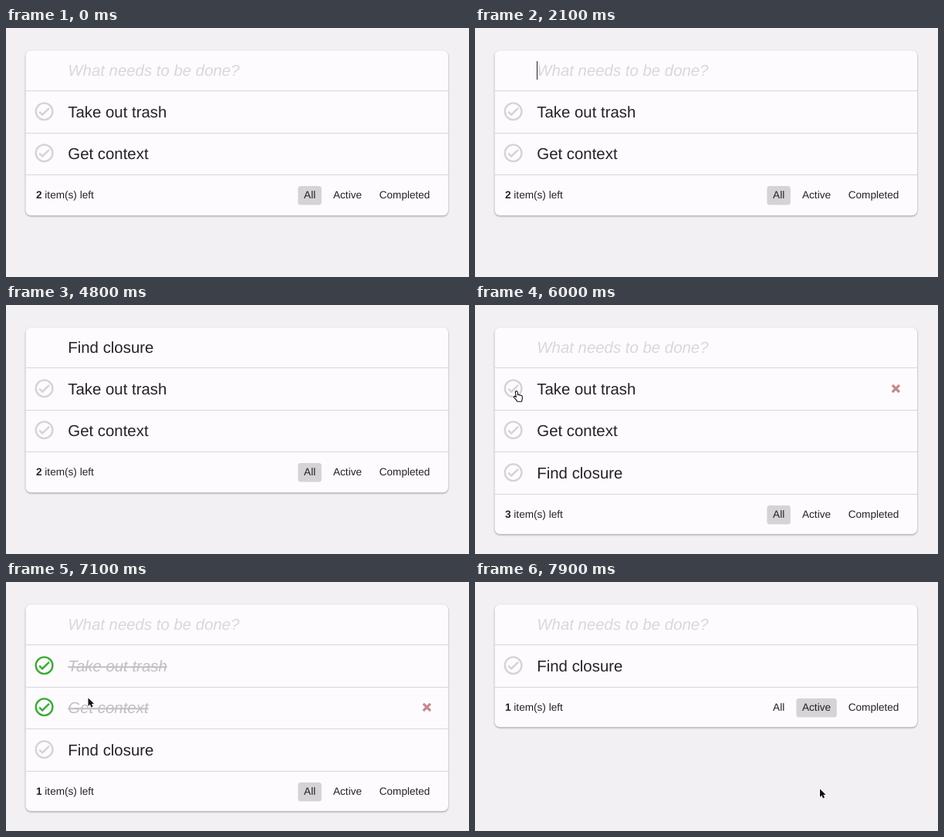
Animation, 600 px wide and 323 px high, one loop 8 s. Source, as an HTML page:

```html
<!DOCTYPE html>
<html lang="en">
<head>
<meta charset="utf-8">
<title>Todo list</title>
<style>
  html, body { margin: 0; width: 100%; height: 100%; overflow: hidden; background: #f2f0f3; }
  svg { display: block; }
  text { font: 20.4px "Liberation Sans", Arial, sans-serif; fill: #242226; white-space: pre; text-rendering: geometricPrecision; }
  .card { fill: #fdfbfe; filter: drop-shadow(0 1px 1px rgba(0, 0, 0, .38)); }
  .line { fill: #d8d6d9; }
  .hint { font-style: italic; fill: #d9d7da; }
  .done { font-style: italic; text-decoration: line-through; text-decoration-thickness: 1.4px; }
  .cross { stroke: #c48a8e; stroke-width: 3.2; }
  .pill { fill: #d5d3d6; }
  .foot text { font-size: 13.6px; }
  .foot tspan { font-weight: bold; }
  .arrow { fill: #111; stroke: #fff; stroke-width: 1.2; paint-order: stroke; }
  .hand { fill: #fff; stroke: #111; stroke-width: 1.1; stroke-linejoin: round; }
  .beam { fill: none; stroke: #333; stroke-width: 1.1; }
</style>
</head>
<body>
<svg width="600" height="323" viewBox="0 0 600 323">
  <rect id="card" class="card" x="25.5" y="29.2" width="547.5" rx="7"/>
  <rect class="line" x="25.5" y="81" width="547.5" height="1"/>
  <text id="hint" class="hint" x="80.3" y="62">What needs to be done?</text>
  <text id="input" x="80.3" y="62"></text>
  <rect id="caret" y="43" width="1" height="24" fill="#222"/>
  <g id="rows"></g>
  <g id="foot" class="foot">
    <text x="39" y="221.2"><tspan id="count">2</tspan> item(s) left</text>
    <rect id="pill" class="pill" y="205" height="24.6" rx="3.5"/>
    <text x="386.1" y="221.2">All</text>
    <text x="424" y="221.2">Active</text>
    <text x="483.7" y="221.2">Completed</text>
  </g>
  <g id="cursor">
    <path class="arrow" d="M0 0V10.4L2.4 8.2L4 12L6 11.2L4.4 7.4H7.6Z"/>
    <path class="hand" d="M-1 1Q-1-.4 .4-.4Q1.6-.4 1.8 1L2.3 4.6Q3.6 3.8 4.3 5Q5.6 4.3 6.2 5.6Q7.8 5.1 8 6.8V9.5Q8 11 7 13.3H1.6Q.6 11.4-2.6 8.2Q-3.6 6.8-2.4 6.4Q-1.2 6.2 0 7.4Z"/>
    <path class="beam" d="M-2.5-7.5Q0-7.5 0-6V6Q0 7.5-2.5 7.5M2.5-7.5Q0-7.5 0-6V6Q0 7.5 2.5 7.5"/>
  </g>
</svg>
<script>
const LOOP = 8000, TICK = 100, PITCH = 54.4;
const ADD = 5100, FILTER = 7800;
const ENTRY = 'Find closure';
const items = [
  { label: 'Take out trash', done: 6100 },
  { label: 'Get context', done: 6700 },
  { label: ENTRY, done: Infinity }
];

// [time, characters typed]
const typing = [[2400, 1], [2500, 2], [2600, 4], [2700, 5], [3700, 6], [3800, 7],
  [3900, 8], [4000, 9], [4100, 11], [4200, 12], [ADD, 0]];
const caretOn = [[1100, 1600], [2100, 3200], [3700, 4700], [ADD, 5600]];

// Pointer visits: each lasts until its end, moving through [time, x, y]
const visits = [
  { end: 1400, path: [[700, 1, 71], [800, 36, 58], [900, 69, 46], [1100, 69, 46], [1200, 78, 36], [1300, 94, 3]] },
  { end: 4800, path: [[4700, 97.6, 152]] },
  { end: LOOP, path: [[5600, 84, 26], [5700, 72, 52], [5800, 60, 90], [5900, 54, 108], [6000, 53.3, 112],
    [6300, 53, 113], [6500, 52, 140], [6600, 51, 163], [6800, 52, 164], [7000, 82, 157], [7100, 106.5, 150.5],
    [7200, 165, 172], [7400, 345, 243], [7600, 438, 267], [7900, 447, 268.5]] }
];

const $ = id => document.getElementById(id);
const clamp = v => Math.max(0, Math.min(1, v));
const show = (el, on) => el.setAttribute('display', on ? 'inline' : 'none');
const move = (el, x, y) => el.setAttribute('transform', `translate(${x} ${y})`);
const mix = (a, b, k) => `rgb(${a.map((v, i) => Math.round(v + (b[i] - v) * k))})`;

$('rows').innerHTML = items.map(({ label }) => `<g>
  <g transform="translate(35.1 93.8) scale(1.204)">
    <circle cx="12" cy="12" r="9" fill="none" stroke-width="2"/>
    <path d="M16.59 7.58L10 14.17L7.41 11.59L6 13L10 17L18 9Z" stroke="none"/>
  </g>
  <text x="80.3" y="116">${label}</text>
  <path class="cross" d="M540.8 103.8l9.2 9.2m0-9.2l-9.2 9.2"/>
  <rect class="line" x="25.5" y="136" width="547.5" height="1"/>
</g>`).join('');
const rows = [...$('rows').children].map(el => {
  const [icon, text, cross] = el.children;
  return { el, icon, text, cross };
});
const [arrow, hand, beam] = $('cursor').children;

function pointer(t) {
  const visit = visits.find(v => t >= v.path[0][0] && t < v.end);
  if (!visit) return null;
  const { path } = visit;
  const i = path.findIndex(p => p[0] > t);
  if (i < 0) return path[path.length - 1].slice(1);
  const [t0, x0, y0] = path[i - 1], [t1, x1, y1] = path[i];
  const k = (t - t0) / (t1 - t0);
  return [x0 + (x1 - x0) * k, y0 + (y1 - y0) * k];
}

function drawPointer(p, shown) {
  show($('cursor'), p);
  if (!p) return;
  const [x, y] = p, rowsEnd = 82 + shown * PITCH;
  const overInput = x > 26 && x < 573 && y > 29 && y < 82;
  const overCheck = x > 37 && x < 62 && y > 94 && y < rowsEnd;
  const overLink = x > 417 && x < 469 && y > rowsEnd + 14 && y < rowsEnd + 40;
  const kind = overInput ? beam : overCheck || overLink ? hand : arrow;
  for (const el of [arrow, hand, beam]) show(el, el === kind);
  move($('cursor'), x, y);
}

function draw(t) {
  const p = pointer(t);
  const filtered = t >= FILTER;
  let shown = 0;

  items.forEach(({ done }, i) => {
    const { el, icon, text, cross } = rows[i];
    const visible = filtered ? i === 2 : i < 2 || t >= ADD;
    show(el, visible);
    if (!visible) return;
    const dy = Math.round(shown++ * PITCH);
    const k = t < done ? 0 : clamp((t - done + TICK) / 400);
    const color = mix([213, 211, 214], [58, 172, 52], k);
    move(el, 0, dy);
    icon.setAttribute('fill', color);
    icon.setAttribute('stroke', color);
    text.style.fill = mix([36, 34, 38], [193, 191, 194], k);
    text.setAttribute('class', k ? 'done' : '');
    show(cross, p && p[0] > 26 && p[0] < 573 && p[1] > 82 + dy && p[1] <= 136 + dy && t > ADD);
  });

  const typed = typing.reduce((n, [at, count]) => t >= at ? count : n, 0);
  $('input').textContent = ENTRY.slice(0, typed);
  show($('hint'), !typed);
  show($('caret'), caretOn.some(([a, b]) => t >= a && t < b));
  $('caret').setAttribute('x', Math.floor(80.3 + (typed ? $('input').getComputedTextLength() : 0)));

  $('card').setAttribute('height', Math.round(105 + shown * PITCH));
  move($('foot'), 0, Math.round((shown - 2) * PITCH + .3));
  $('count').textContent = items.filter(({ done }, i) => (i < 2 || t >= ADD) && t < done).length;
  $('pill').setAttribute('x', filtered ? 416.4 : 378.4);
  $('pill').setAttribute('width', filtered ? 52.4 : 30.5);
  drawPointer(p, shown);
}

const start = performance.now();
function frame() {
  const t = (performance.now() - start) % LOOP;
  draw(Math.floor(t / TICK) * TICK);
  requestAnimationFrame(frame);
}
frame();
</script>
</body>
</html>
```
